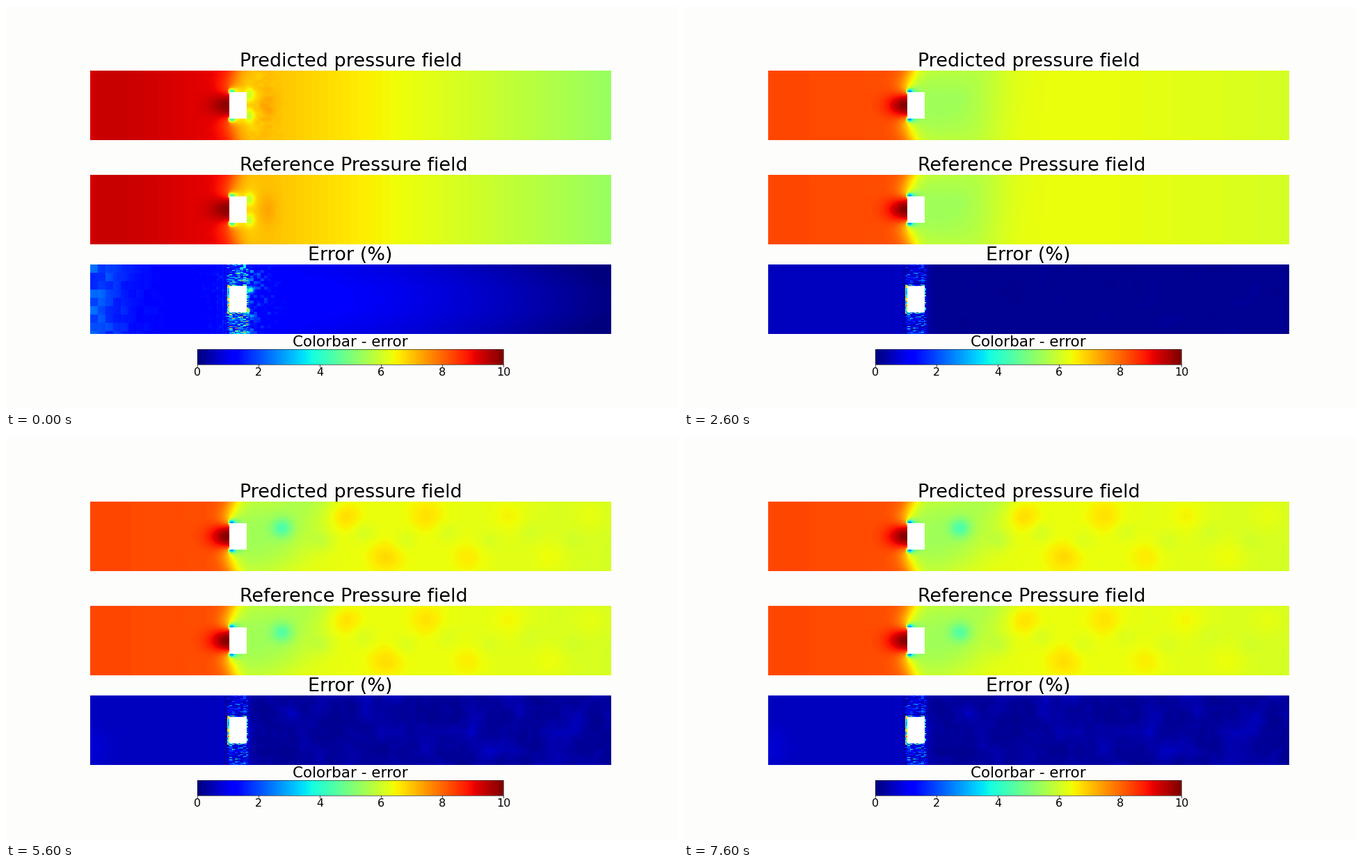
Recreate the animation shown at these times as a matplotlib script. Size 966 by 580 pixels, loop 8 s.

```python
import numpy as np
import matplotlib as mpl
import matplotlib.pyplot as plt
from matplotlib.animation import FuncAnimation
from matplotlib.patches import Rectangle

W, H, DPI = 966, 580, 100
PW, PH = 749, 100            # panel size
LEFT, TOPS = 121, (93, 243, 372)
STEP, FRAMES = 200, 40
JET = mpl.colormaps["jet"]
plt.rcParams["font.family"] = "DejaVu Sans"

cols, rows = np.arange(PW), np.arange(PH)
U, V = np.meshgrid(cols + 0.5 - 200, rows + 0.5 - 50)   # from the obstacle's front
A = np.abs(V)
SOLID = (U > 0) & (U < 25) & (A < 19)
RIM = (U > -3) & (U < 27) & (A < 21)


def bump(u, v, su, sv, field=V):
    return np.exp(-((U - u) / su) ** 2 - ((field - v) / sv) ** 2)


def rise(x, width):
    return 1 / (1 + np.exp(np.clip(-x / width, -50, 50)))


def cells(seed, w, h):
    r = np.random.default_rng(seed).random((PH // h + 1, PW // w + 1))
    return r[rows // h][:, cols // w]


def clouds(seed, w, h):
    r = np.random.default_rng(seed).random((PH // h + 2, PW // w + 2))
    x, y = cols / w, rows / h
    i, j = y.astype(int), x.astype(int)
    fy, fx = (y - i)[:, None], x - j
    r = r[i] * (1 - fy) + r[i + 1] * fy
    return r[:, j] * (1 - fx) + r[:, j + 1] * fx


def flow(front, drop, stag):
    """Upstream level, a curved drop at the obstacle and a stagnation zone."""
    bend = 12 * np.clip((A - 19) / 31, 0, 1) - 5
    p = front - drop * rise(U - bend, 8.5)
    ahead = np.minimum(U, 0)
    shield = rise(17 - A, 2.5 - 0.15 * ahead) * (U < 0)
    p = shield * front + (1 - shield) * p
    p += stag * bump(0, 0, 27, 18) * (U < 0)
    p -= 0.32 * bump(3, 20, 5, 3.5, A) * (U > -2)
    p -= 0.07 * bump(9, 20, 10, 7, A) * (U > 0)
    return p


def early():
    slope = np.where(U < 0, -0.0002, -0.00035) * U
    p = flow(0.905 + slope, 0.18, 0.085)
    p += 0.03 * bump(55, 0, 14, 22) - 0.03 * bump(28, 0, 18, 60)
    p -= 0.1 * bump(29, 15, 7, 9, A)
    return p - 0.025 * np.exp(-(U + 200) / 12)


def steady(growth):
    """Settled flow; the shedding wake tilts the line where pressure recovers."""
    p = flow(0.825 - 0.00005 * np.minimum(U, 0), 0.285, 0.175)
    p += 0.095 * rise(U - 122 + growth * (10 + 0.6 * V), 20)
    p -= 0.0001 * np.maximum(U - 280, 0)
    return p + 0.035 * (A / 50) ** 2 * bump(50, 0, 50, 200)


def street(growth, front):
    """Vortices in two staggered rows, fading downstream."""
    s = -0.11 * bump(76, -12, 15, 14)
    for n in range(7):
        side, fade = (-1) ** n, 0.85 ** n
        s += 0.05 * fade * bump(166 + 59 * n, -30 * side, 24, 22)
        s -= 0.03 * fade * bump(133 + 60 * n, 6 * side, 17, 15)
    return growth * s * rise(front - U, 40)


START = early()
SMEAR = (clouds(3, 6, 5) - 0.5) * 0.03 * bump(45, 0, 22, 200)
STREAKS = cells(5, 4, 1) ** 6
SPECKS = cells(6, 5, 2) ** 4
RIPPLE = cells(7, 2, PH)
EDGE = cells(8, 3, 2) ** 2
BLOCKS = cells(9, 11, 12)
CRUMBS = cells(10, 5, 4) ** 4
PATCHES = clouds(11, 22, 26) ** 2 + 0.4 * clouds(12, 8, 9) ** 2
STRIP = rise(15 - np.abs(U - 12), 1) * (1 + 0.008 * V)


def error(k, old, growth):
    first = 0.125 * np.cos(np.pi / 2 * np.clip(U, 0, 560) / 560)
    first += 0.07 * np.exp(-((U + 200) / 50) ** 2)
    first -= 0.02 * (A / 50) ** 2 * (U > 60)
    first += (BLOCKS - 0.4) * 0.1 * np.exp(-(U + 200) / 45)
    first += CRUMBS * 0.2 * np.exp(-np.abs(U - 27) / 20)

    level = 0.055 + 0.027 * np.cos(np.pi * (np.clip(k, 3, 9) - 3) / 4)
    calm = 0.015 + (level - 0.015) * rise(28 - U, 5)
    calm += 0.02 * growth * bump(-200, 25, 30, 30)
    calm += 0.04 * growth * PATCHES * (U > 25)
    calm += 0.06 * np.exp(-(k - 7) ** 2) * (bump(224, 28, 18, 26) + bump(329, 28, 20, 28))

    e = old * first + (1 - old) * calm
    e += (RIPPLE - 0.4) * 0.09 * np.exp(-np.abs(U + 3) / 10) * (U < 0)
    e += STRIP * (STREAKS * (0.28 + 0.2 * old) + SPECKS * 0.12)
    e = np.where(RIM, np.maximum(e, 0.25 * (U < 0) + 0.55 * EDGE), e)
    e += old * 0.5 * (bump(27, 17, 2, 4) + 0.6 * bump(31, -14, 4, 4))
    return e * (1 - 0.6 * np.exp(-(549 - U) / 2))


def paint(field):
    rgb = JET(np.clip(field, 0, 1))[..., :3]
    rgb[SOLID] = 1
    return rgb


def state(k):
    old = max(0, 1 - k / 3) ** 2
    t = np.clip((k - 4) / 4, 0, 1)
    growth = t * t * (3 - 2 * t)
    base = old * START + (1 - old) * steady(growth)
    vortices = street(growth, 39 * max(k - 4, 0) ** 2)
    return [paint(base + vortices + old * SMEAR),
            paint(base + 0.9 * vortices),
            paint(error(k, old, growth))]


STATES = [state(k) for k in range(16)]

fig = plt.figure(figsize=(W / DPI, H / DPI), dpi=DPI, facecolor="#fdfdfc")
ax = fig.add_axes([0, 0, 1, 1])
ax.axis("off")


def show(img, x, y, w, h, **kw):
    return ax.imshow(img, extent=(x, x + w, y + h, y), aspect="auto",
                     interpolation="nearest", **kw)


def label(x, y, s, px, ha="center"):
    ax.text(x, y, s, fontsize=px * 72 / DPI, ha=ha, va="baseline", color="black")


panels = [show(img, LEFT, y, PW, PH) for img, y in zip(STATES[0], TOPS)]
show(np.linspace(0, 1, 440)[None], 275, 494, 440, 22, cmap=JET)
ax.add_patch(Rectangle((275, 494), 440, 22, fill=False, ec="black", lw=0.4))

label(335.5, TOPS[0] - 6, "Predicted pressure field", 27, "left")
label(335.5, TOPS[1] - 6, "Reference Pressure field", 27, "left")
label(495, TOPS[2] - 6, "Error (%)", 27)
label(495, 490, "Colorbar - error", 21.5)
for n in range(0, 11, 2):
    x = 275 + 44 * n
    ax.plot([x, x], [516, 519], color="black", lw=0.5)
    label(x, 532.5, str(n), 16)

ax.set_xlim(0, W)
ax.set_ylim(H, 0)


def update(i):
    second, ms = divmod(i * STEP, 1000)
    k = 2 * second + (ms >= 600)
    for panel, img in zip(panels, STATES[k]):
        panel.set_data(img)
    return panels


anim = FuncAnimation(fig, update, frames=FRAMES, interval=STEP, repeat=True,
                     repeat_delay=0, blit=False)
plt.show()
```
